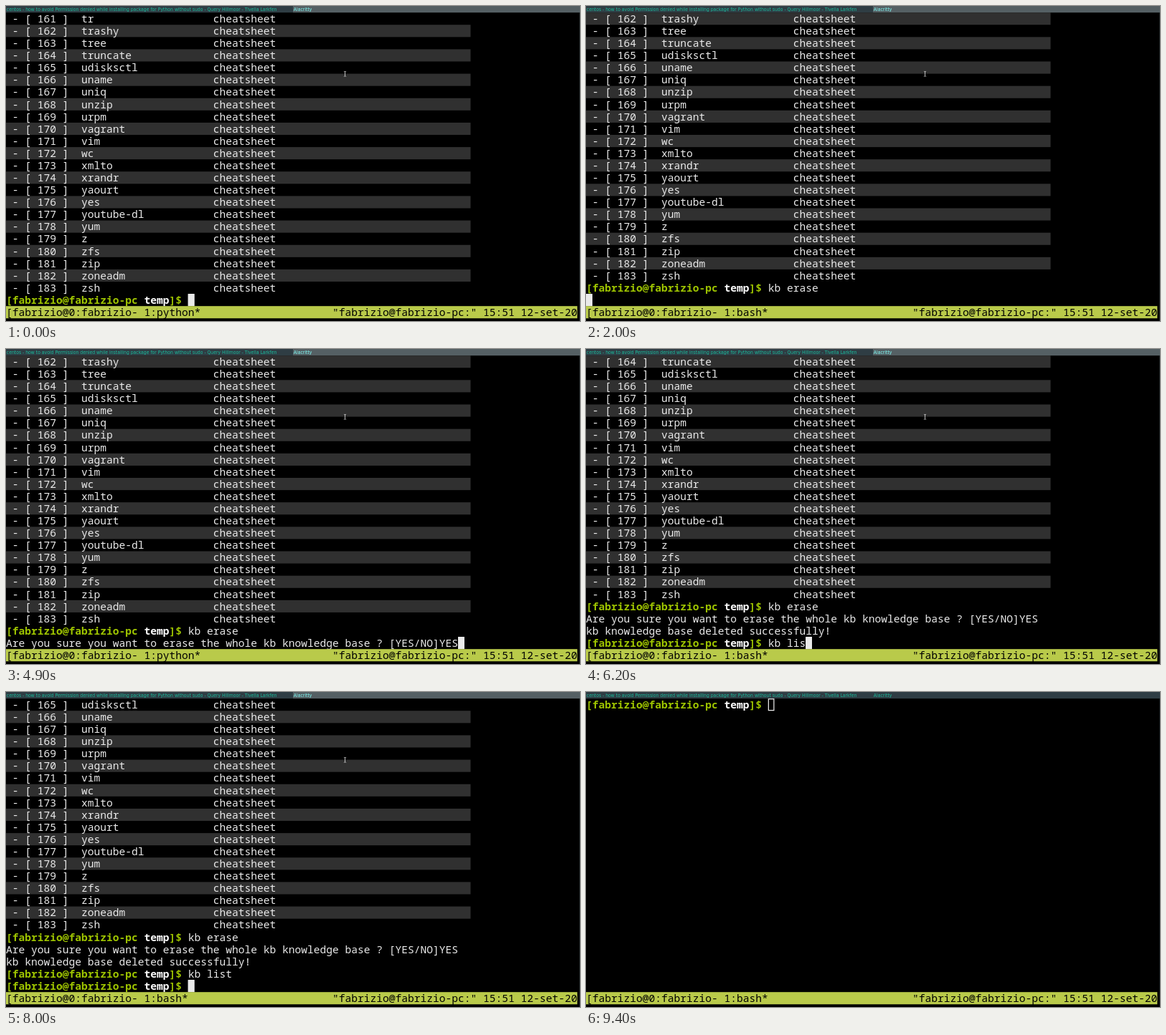
Write an HTML page that moves like this. It is 800 px wide and 440 px high and loops after 9.8 s.

```html
<!DOCTYPE html>
<html lang="en">
<head>
<meta charset="utf-8">
<title>Terminal session</title>
<style>
  html, body { margin: 0; width: 100%; height: 100%; overflow: hidden; background: #000; }
  /* The desktop is laid out at 1920 x 1056 and scaled to the 800 x 440 stage. */
  #desk {
    position: absolute; width: 1920px; height: 1056px; overflow: hidden;
    transform: scale(.4166667); transform-origin: 0 0;
    background: #000; color: #eaeaea;
    font: 35px/41px "Noto Sans Mono", "DejaVu Sans Mono", monospace;
    font-variant-ligatures: none;
  }
  .tab {
    position: absolute; top: 0; width: 960px; height: 22px; padding-left: 2px;
    box-sizing: border-box; overflow: hidden; white-space: nowrap;
    background: #2f3d44; color: #1abc9c;
    font: 14.667px/22px "DejaVu Sans", sans-serif;
  }
  #term { left: 960px; }
  .focus #term { background: #556064; color: #80fff9; }
  #edge { position: absolute; right: 0; top: 22px; width: 1px; bottom: 0; background: #2f3d44; }
  .focus #edge { background: #556064; }
  #rows { position: absolute; top: 22px; left: 0; width: 1911px; }
  .row { display: flex; height: 41px; white-space: pre; }
  .row span { position: relative; top: -1.5px; }
  .row.even { width: 1554px; background: #303030; }
  .row b { color: #9ec400; }
  .row em { color: #fff; font-style: normal; }
  .cursor { width: 21px; height: 41px; box-sizing: border-box; border: 3px solid #eaeaea; }
  .focus .cursor { background: #eaeaea; }
  #bar {
    position: absolute; top: 1006px; left: 0; width: 1911px;
    justify-content: space-between; background: #b9ca4a; color: #000;
  }
  #beam { position: absolute; left: 1129px; top: 218px; display: none; }
  .focus #beam { display: block; }
</style>
</head>
<body>
<div id="desk" class="focus">
  <div class="tab">centos - how to avoid Permission denied while installing package for Python without sudo - Query Hillmoor - Tivella Larkfen</div>
  <div class="tab" id="term">Alacritty</div>
  <div id="edge"></div>
  <div id="rows"></div>
  <div id="bar" class="row"><span id="left"></span><span id="right"></span></div>
  <svg id="beam" width="10" height="19" fill="none" stroke="#ddd" stroke-width="2">
    <path d="M1 1h3l1 1 1-1h3M5 2v15M1 18h3l1-1 1 1h3"/>
  </svg>
</div>
<script>
const LOOP = 9800, ROWS = 24, FIRST = 161;
const user = 'fabrizio', host = user + '-pc';
const tools = ('tr trashy tree truncate udisksctl uname uniq unzip urpm vagrant vim wc ' +
  'xmlto xrandr yaourt yes youtube-dl yum z zfs zip zoneadm zsh').split(' ');
const prompt = `<b>[${user}@${host} <em>temp</em>]$</b> `;
const question = 'Are you sure you want to erase the whole kb knowledge base ? [YES/NO]';
const $ = id => document.getElementById(id);

const listing = tools.map((name, i) => ({
  text: ` - [ ${FIRST + i} ]  ${name.padEnd(21)}cheatsheet`,
  even: (FIRST + i) % 2 === 0
}));

const print = text => s => { s.rows[s.rows.length - 1].text += text; };
const newline = s => { s.rows.push({ text: '' }); };
const job = name => s => { s.job = name; };
const clear = s => { s.rows = [{ text: prompt }]; };
const blur = s => { s.focus = false; };
const type = (start, text, step = 100) =>
  [...text].map((ch, i) => [start + i * step, print(ch)]);

// Each entry is a time in ms and the change made to the screen then.
const events = [
  [1100, job('bash')],
  ...type(1100, 'kb eras'),
  [1900, print('e')],
  [2000, newline],
  [2300, print(question)],
  [3700, job('python')],
  ...type(3700, 'YES', 200),
  [5000, newline],
  [5100, print('kb knowledge base deleted successfully!')],
  [5100, newline],
  [5100, print(prompt)],
  [5700, job('bash')],
  ...type(5700, 'kb lis'),
  [6400, print('t')],
  [6500, newline],
  [6800, print(prompt)],
  [8200, clear],
  [8600, blur]
];

function stateAfter(count) {
  const s = { job: 'python', focus: true, rows: listing.map(r => ({ ...r })) };
  s.rows.push({ text: prompt });
  events.slice(0, count).forEach(([, change]) => change(s));
  return s;
}

function draw({ rows, job, focus }) {
  const shown = rows.slice(-ROWS);
  $('rows').innerHTML = shown.map((r, i) =>
    `<div class="row${r.even ? ' even' : ''}"><span>${r.text}</span>` +
    (i === shown.length - 1 ? '<div class="cursor"></div>' : '') + '</div>').join('');
  $('left').textContent = `[${user}@0:${user}- 1:${job}*`;
  $('desk').classList.toggle('focus', focus);
}

let last = -1;
function tick() {
  const t = performance.now() % LOOP;
  const count = events.filter(([at]) => at <= t).length;
  if (count !== last) draw(stateAfter(last = count));
  requestAnimationFrame(tick);
}

$('right').textContent = `"${user}@${host}:" 15:51 12-set-20`;
tick();
</script>
</body>
</html>
```
